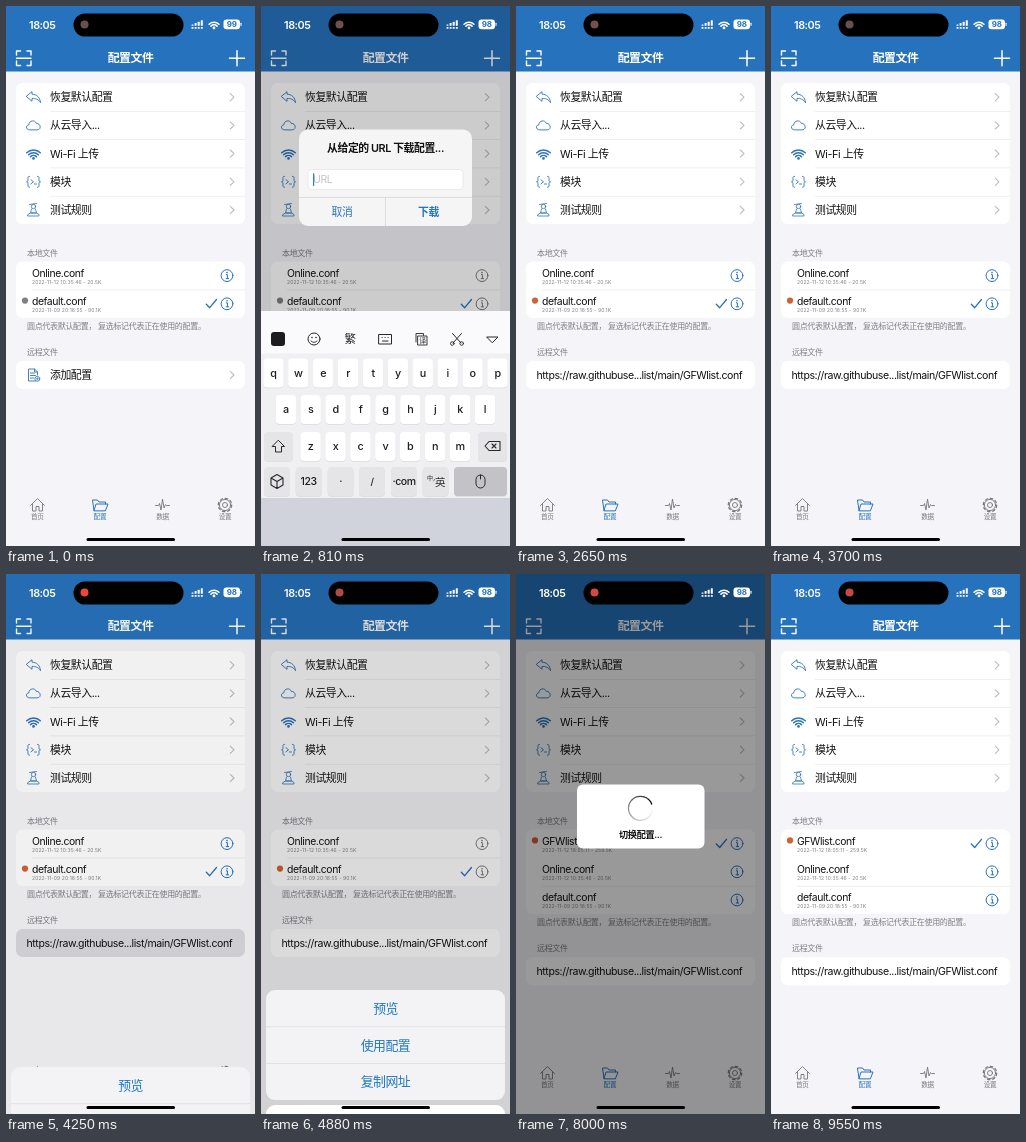
Recreate the animation shown at these times as an HTML page. Size 249 by 540 pixels, loop 9750 ms.

```html
<!DOCTYPE html>
<html lang="zh-CN">
<head>
<meta charset="utf-8">
<title>配置文件</title>
<style>
html, body { margin: 0; width: 100%; height: 100%; overflow: hidden; background: #f4f4f8; }
svg { display: block; width: 100vw; height: 100vh; }
text { font-family: Inter, "Noto Sans CJK SC", "Noto Sans CJK", sans-serif; letter-spacing: -.04em; white-space: pre; }
.line { fill: none; stroke: #2c74ba; stroke-linecap: round; stroke-linejoin: round; }
</style>
</head>
<body>
<svg id="stage" viewBox="0 0 249 540"></svg>
<script>
const LOOP = 9750, ROW = 28.2;
const BLUE = '#2772bd', GRAY = '#7f7f84', INK = '#111';

// Markup helpers
const text = (x, y, s, size, fill = INK, more = '') =>
  `<text x="${x}" y="${y}" font-size="${size}" fill="${fill}" ${more}>${s}</text>`;
const mid = (x, y, s, size, fill, weight = 400) =>
  text(x, y, s, size, fill, `text-anchor="middle" font-weight="${weight}"`);
const box = (x, y, w, h, r, fill, more = '') =>
  `<rect x="${x}" y="${y}" width="${w}" height="${h}" rx="${r}" fill="${fill}" ${more}/>`;
const line = (d, width = 1, color = '#2c74ba') =>
  `<path class="line" d="${d}" stroke-width="${width}" style="stroke:${color}"/>`;
const ring = (x, y, r, width = 1, color = '#2c74ba', more = '') =>
  `<circle class="line" cx="${x}" cy="${y}" r="${r}" stroke-width="${width}" style="stroke:${color}" ${more}/>`;
const disc = (x, y, r, fill, more = '') => `<circle cx="${x}" cy="${y}" r="${r}" fill="${fill}" ${more}/>`;
const group = (id, s) => `<g id="${id}">${s}</g>`;
const at = (x, y, s, k = 1) => `<g transform="translate(${x} ${y}) scale(${k})">${s}</g>`;
const rule = (x, y, w, h = .5, c = '#dedee2') => box(x, y, w, h, 0, c);

const arc = q => `M${-.707 * q} ${-.707 * q}A${q} ${q} 0 0 1 ${.707 * q} ${-.707 * q}`;
const wifi = c => line(arc(7.6), 1.7, c) + line(arc(4.7), 1.7, c) + disc(0, -1.4, 1.5, c);

const icons = [
  line('M-7-1L-1.500-5.500V-3C3-3 6.500 0 7 5.500C5 2 2 1.200-1.500 1.200V3.700Z', .9),
  line('M-4 4.500C-8 4.500-8-.3-4.600-.6C-4.600-5 1.500-6 2.800-2C7-2.600 8.500 4.500 4 4.500Z', .9),
  at(0, 6, line(arc(9.6), 1.5) + line(arc(6.9), 1.5) + line(arc(4.2), 1.5) + disc(0, -1.2, 1.3, BLUE)),
  line('M-4-5.500C-6-5.500-5.500-4-5.500-2C-5.500-.5-6-.2-7 0C-6 .2-5.500 .5-5.500 2C-5.500 4-6 5.500-4 5.500' +
    'M4-5.500C6-5.500 5.500-4 5.500-2C5.500-.5 6-.2 7 0C6 .2 5.500 .5 5.500 2C5.500 4 6 5.500 4 5.500' +
    'M-2.500-2L0 0L-2.500 2M1 2.200H3', .9),
  ring(0, -3.5, 2.2, .8) + line('M-4-5.500L3-6.500M-2-1L-3 3H3L2-1M-5.500 6H5.500V4.500L3 3H-3L-5.500 4.500Z', .8)
];
const docIcon = line('M2 6H-5V-6H1L4-3V0M1-6V-3H4M-3-2H1M-3 0.500H2M-3 3H0', .9) +
  ring(3.8, 3.8, 2.5, .8) + line('M2.600 3.800H5M3.800 2.600V5', .7);

const chevron = y => line(`M224.300 ${y - 3.6}L228 ${y}L224.300 ${y + 3.6}`, 1.1, '#bdbdc1');

const menu = ['恢复默认配置', '从云导入...', 'Wi-Fi 上传', '模块', '测试规则'].map((s, i) => {
  const y = 91.2 + i * ROW;
  return at(27.5, y, icons[i]) + text(44, y + 4, s, 10.85) + chevron(y) + (i ? rule(44, y - ROW / 2, 195) : '');
}).join('');

const fileRow = (y, name, note, top) =>
  text(26, y + 1, name, 10.4) + text(26, y + 8.3, note, 5, GRAY, 'style="letter-spacing:.02em"') +
  `<g class="info">${ring(221, y, 5.9, 1, 'currentColor')}<path d="M220 ${y - 1}H221.400V${y + 3}M219.800 ${y + 3}H223" fill="none" stroke="currentColor"/>${disc(221, y - 3, .8, 'currentColor')}</g>` +
  (top ? rule(26, y - ROW / 2, 213) : '');

const TAB = '#77777b';
const tabs = [
  ['首页', line('M-7 .5L0-6.500L7 .5M-5-1V6H-1.500V1.500H1.500V6H5V-1', .9, TAB)],
  ['配置', line('M-6 5.500L-7.500-5H-2.500L-1-3H5.500V-1M-6 5.500L-4-1H8L5.500 5.500Z', 1, BLUE)],
  ['数据', line('M-7 .5H-4L-3-1.500L-1.500 5L0-6L1.500 3L3-.5L4 .5H7', .9, TAB)],
  ['设置', ring(0, 0, 2.5, .9, TAB) + ring(0, 0, 5.6, .9, TAB) +
    ring(0, 0, 6.7, 1.2, TAB, 'stroke-dasharray="2.600 2.660" style="stroke-linecap:butt"')]
].map(([s, icon], i) => at(31.5 + i * 62.5, 499, icon) +
  mid(31.3 + i * 62.6, 513, s, 6.6, i == 1 ? BLUE : TAB)).join('');

const page =
  box(0, 0, 249, 540, 0, '#f5f4f8') + box(0, 0, 249, 65.5, 0, BLUE) +
  mid(124.5, 55.8, '配置文件', 11.9, '#fff', 600) +
  line('M10.500 49V45H14.500M21 45H25V49M25 55V59.500H21M14.500 59.500H10.500V55M10.500 52.200H25', 1.4, '#fff') +
  line('M223.500 52.200H238.500M231 44.700V59.700', 1.5, '#fff') +
  box(10, 77, 229, 141, 6.5, '#fff') + menu +
  text(21, 250, '本地文件', 8, GRAY) +
  box(10, 255.5, 229, 56.4, 6.5, '#fff', 'id="files"') +
  group('added', fileRow(269.6, 'GFWlist.conf', '2022-11-12 18:05:11 - 259.5K')) +
  group('old', fileRow(269.6, 'Online.conf', '2022-11-12 10:35:46 - 20.5K') +
    fileRow(297.8, 'default.conf', '2022-11-09 20:18:55 - 90.1K', true)) +
  group('mark', disc(19, 294.6, 3.1, GRAY, 'id="dot"') + line('M200.300 298.200L203.700 301.700L210.500 293.500', 1.3, BLUE)) +
  group('low',
    text(21, 323, '圆点代表默认配置， 复选标记代表正在使用的配置。', 8, GRAY) +
    text(21, 349.3, '远程文件', 8, GRAY) +
    box(10, 355, 229, 28, 6.5, '#fff') + box(10, 355, 229, 28, 6.5, '#d3d3d8', 'id="press"') +
    group('addRow', at(27.5, 369, docIcon) + text(44, 373, '添加配置', 10.85) + chevron(369)) +
    group('urlRow', text(20.5, 372.8, 'https://raw.githubuse...list/main/GFWlist.conf', 10.57))) +
  tabs;

const alertBox =
  box(38, 123.5, 173, 96.5, 9, '#f5f5f6') +
  mid(124.5, 146, '从给定的 URL 下载配置...', 10.85, INK, 600) +
  box(47, 163.5, 155, 20, 3.5, '#fff', 'stroke="#d0d0d4" stroke-width=".4"') +
  text(52, 177, 'URL', 10.57, '#c3c3c7', 'id="hint"') +
  text(197, 177, ':ket-GFWlist/main/GFWlist.conf', 10.57, INK, 'id="typed" text-anchor="end"') +
  box(0, 167, 1.2, 13, .6, '#2f7fe0', 'id="caret"') +
  rule(38, 191.5, 173, .5, '#c4c4c8') + rule(124.3, 191.5, .5, 28.5, '#c4c4c8') +
  mid(81, 210, '取消', 10.85, '#2873c2') + mid(167.5, 210, '下载', 10.85, '#2873c2', 600);

const paste = box(33, 144, 44, 16, 4, '#e1e1e4') + mid(44.5, 154.5, '粘贴', 6.5, '#555') +
  rule(55, 146, .5, 12, '#bbb') + line('M62 149H64M67 149H69M62 155H64M67 155H69M62 149V151M69 149V151M62 155V153M69 155V153', .8, '#666');

// Keyboard
const K = '#28282c', SOFT = '#e5e5e8';
const key = (x, y, w, s, size = 10.8, fill = '#fff') =>
  box(x - w / 2, y + .7, w, 29, 4, '#dadade') + box(x - w / 2, y, w, 29, 4, fill) +
  mid(x, y + 14.5 + size * .34, s, size, '#1c1c1e', 500);
const letters = (s, x, y) => [...s].map((c, i) => key(x + i * 24.9, y, 20.3, c)).join('');
const keyboard =
  box(0, 305, 249, 235, 0, '#f0f0f3') + box(0, 305, 249, 42.5, 0, '#fafafc') + box(0, 492, 249, 48, 0, '#d1d3dc') +
  box(10, 326, 14, 14, 3, '#1c1c1e') +
  ring(53, 333, 6, 1, K) + disc(51, 331.5, .8, K) + disc(55, 331.5, .8, K) + line('M50 335Q53 338 56 335', .9, K) +
  mid(89, 337.3, '繁', 11.5, K) +
  line('M118 328.500H130.500V338H118ZM121 331.500H121.200M124 331.500H124.200M127 331.500H127.200M121.500 335H127', 1, K) +
  line('M155 336V327.500H162.500V329.500M157 330H166V339H157Z', .9, K) + mid(161.5, 337.3, '译', 7, K) +
  line('M191.500 327.500L200 337M200.500 327.500L192 337', 1, K) + ring(191.3, 337.5, 1.8, .9, K) + ring(200.7, 337.5, 1.8, .9, K) +
  line('M226 331H237L231.500 336.500Z', 1, K) +
  letters('qwertyuiop', 12.4, 352.5) + letters('asdfghjkl', 24.8, 389) + letters('zxcvbnm', 49.6, 426) +
  key(17.5, 426, 29, '', 1, SOFT) + line('M17.500 434.500L23.500 440.500H20.500V446H14.500V440.500H11.500Z', 1, K) +
  key(231.5, 426, 29, '', 1, SOFT) + line('M224 440L228 435.500H239V444.500H228ZM231 438L235 442M235 438L231 442', 1.1, K) +
  key(16, 461, 26, '', 1, SOFT) + line('M16 468.500L22 472V479L16 482.500L10 479V472ZM10 472L16 475.500L22 472M16 475.500V482', 1.1, K) +
  key(47.7, 461, 26, '123', 10.5, SOFT) + key(79.7, 461, 26, '·', 10.8, SOFT) + key(111, 461, 26, '/', 9.5, SOFT) +
  key(143, 461, 26, '·com', 10.5, SOFT) + key(174.5, 461, 26, '', 1, SOFT) +
  mid(169, 474, '中', 6, K) + line('M172.500 475L174 473', .6, K) + mid(179, 479.5, '英', 10.5, K) +
  key(219.5, 461, 53, '', 1, '#c3c2c6') + box(215, 469, 9, 13, 4.5, 'none', `stroke="${K}"`) + line('M219.500 469V473', 1, K);

const sheetBox =
  box(5, 367, 239, 110, 9, '#f3f2f4') + box(5, 403.7, 239, 36.6, 0, '#d9d9dd', 'id="choice"') +
  ['预览', '使用配置', '复制网址'].map((s, i) => mid(124.5, 390 + i * 36.6, s, 12.9, '#1f78c4')).join('') +
  rule(5, 403.6, 239, .5, '#cfcfd3') + rule(5, 440.2, 239, .5, '#cfcfd3') +
  box(5, 482, 239, 36.5, 9, '#fff') + mid(124.5, 504.7, '取消', 12.9, '#1f78c4', 600);

const polar = a => `${12 * Math.cos(a)} ${12 * Math.sin(a)}`;
const spinner = Array.from({ length: 30 }, (_, i) => {
  const a = (i - 30) * Math.PI / 15;
  return `<path d="M${polar(a)}A12 12 0 0 1 ${polar(a + .215)}" fill="none" stroke="#000" stroke-width="1.300" opacity="${((i + 1) / 30) ** 1.4}"/>`;
}).join('');
const hudBox = box(61, 210.5, 127.5, 64, 6, '#fff') + group('spin', spinner) +
  mid(124.5, 263.6, '<tspan id="hudText"></tspan>', 9.2, INK, 600);

const status =
  text(23, 22.6, '18:05', 10.8, '#fff', 'font-weight="600"') +
  box(67.5, 7.5, 110, 23, 11.5, '#000') + disc(78.5, 18.5, 4, '', 'id="rec"') +
  [0, 1, 2, 3].map(i => box(185.5 + i * 3.1, 18.5 - i * 1.4, 2, 1.3 + i * 1.4, .5, '#fff') +
    box(185.5 + i * 3.1, 21, 2, 1.8, .5, '#fff')).join('') +
  at(208, 23.2, wifi('#fff'), .92) +
  box(217.5, 13.5, 16.5, 9.8, 3, '#fff') + box(234.5, 16.8, 1, 3.2, .5, '#fff') +
  mid(225.7, 21.3, '<tspan id="battery"></tspan>', 8, BLUE, 700);

document.getElementById('stage').innerHTML = page +
  box(0, 0, 249, 540, 0, '#000', 'id="dim"') +
  group('alert', alertBox) + group('paste', paste) + group('keyboard', keyboard) + group('sheet', sheetBox) +
  box(0, 0, 249, 540, 0, '#000', 'id="hudDim"') + group('hud', hudBox) + status +
  box(80.5, 532, 88.5, 3, 1.5, '#000');

// Motion
const $ = Object.fromEntries([...document.querySelectorAll('[id]')].map(e => [e.id, e]));
const infos = document.querySelectorAll('.info');
const fade = (e, v) => {
  e.style.opacity = v;
  e.style.display = v > 0 ? '' : 'none';
};
const move = (e, y) => e.setAttribute('transform', `translate(0 ${y})`);
const ramp = (t, a, b) => {
  const u = Math.min(1, Math.max(0, (t - a) / (b - a)));
  return u * u * (3 - 2 * u);
};
const pulse = (t, a, b, c, d) => ramp(t, a, b) - ramp(t, c, d);
const within = (t, a, b) => +(t >= a && t < b);

function draw(t) {
  const alert = pulse(t, 350, 600, 2100, 2350);
  const keys = pulse(t, 380, 800, 2150, 2560);
  const sheet = pulse(t, 4130, 4480, 4783, 5063);
  const hud = pulse(t, 5080, 5330, 8980, 9280);
  const grown = ramp(t, 7260, 7480);
  const swapped = t >= 7260;
  const remote = t >= 2400;
  const typed = t >= 1800;

  fade($.dim, .2 * Math.max(alert, sheet));
  infos.forEach(e => e.style.color = alert + sheet > .3 ? '#77777c' : BLUE);

  fade($.alert, alert);
  const k = t < 1000 ? 1.15 - .15 * alert : 1;
  $.alert.setAttribute('transform', `translate(124.5 172) scale(${k}) translate(-124.5 -172)`);
  fade($.hint, +!typed);
  fade($.typed, +typed);
  $.caret.setAttribute('x', typed ? 197 : 52);
  fade($.paste, pulse(t, 1230, 1370, 1740, 1920));
  fade($.keyboard, +(keys > 0));
  move($.keyboard, 235 * (1 - keys));

  fade($.press, Math.max(pulse(t, 140, 210, 350, 560), pulse(t, 3980, 4050, 4200, 4400)));
  fade($.addRow, +!remote);
  fade($.urlRow, +remote);

  fade($.sheet, +(sheet > 0));
  move($.sheet, 174 * (1 - sheet));
  fade($.choice, within(t, 4620, 4780));

  fade($.hudDim, .4 * hud);
  fade($.hud, hud);
  $.spin.setAttribute('transform', `translate(124.5 234.3) rotate(${(t - 5440) / 853 * 360 - 20})`);
  $.hudText.textContent = swapped ? '切换配置...' : '下载...';

  $.files.setAttribute('height', 56.4 + ROW * grown);
  fade($.added, grown);
  move($.old, ROW * grown);
  move($.low, ROW * grown);
  move($.mark, swapped ? -ROW : 0);
  $.dot.setAttribute('fill', remote ? '#d06237' : '#808084');

  const glow = ((1 - Math.cos(t / 925 * 2 * Math.PI)) / 2) ** 1.5;
  $.rec.setAttribute('fill', `rgb(${105 + 150 * glow}, ${80 - 10 * glow}, ${80 - 20 * glow})`);
  $.battery.textContent = t < 700 ? '99' : '98';
}

const start = performance.now();
(function tick() {
  draw((performance.now() - start) % LOOP);
  requestAnimationFrame(tick);
})();
</script>
</body>
</html>
```
